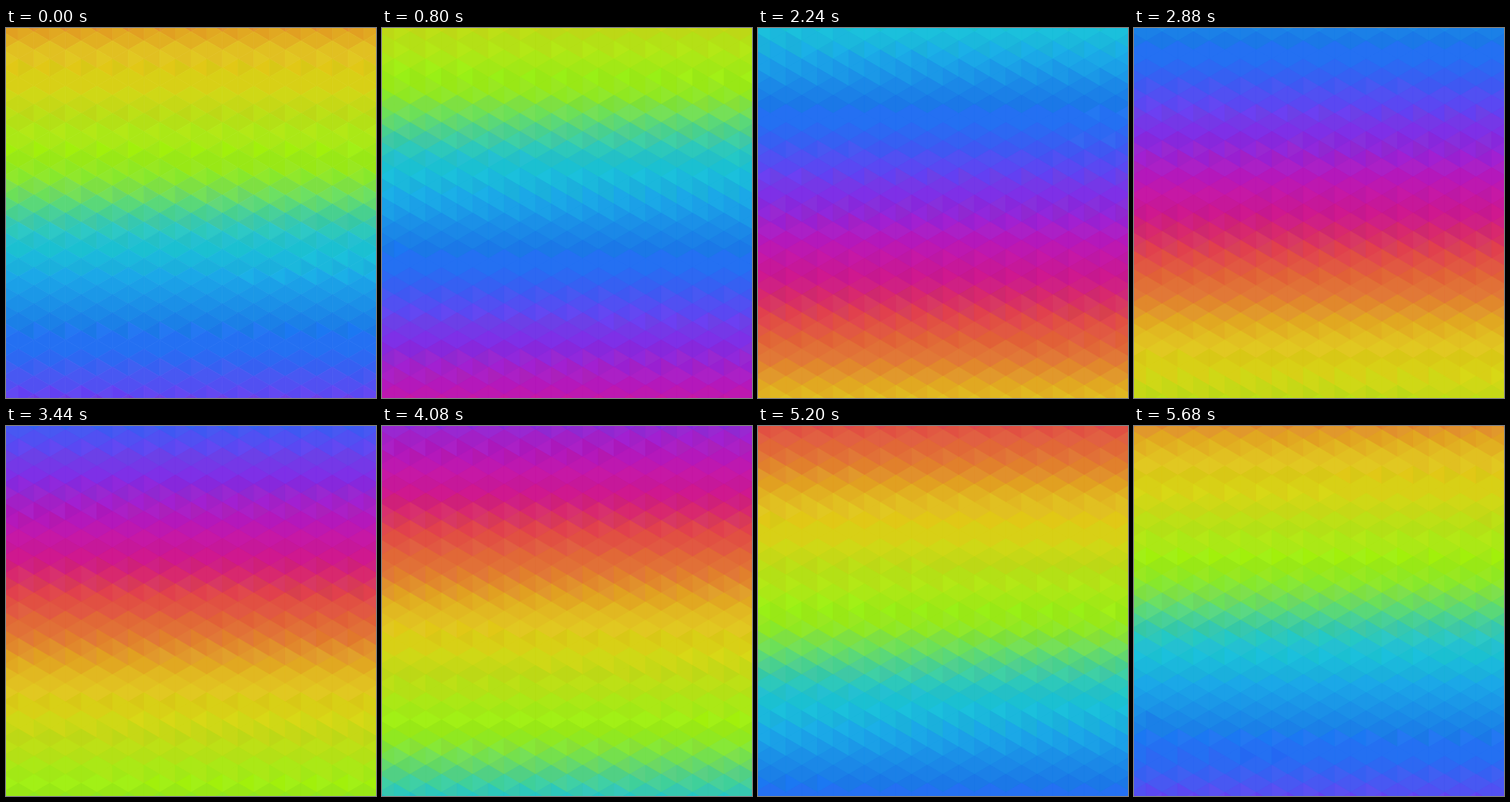
Write an HTML page with a canvas that moves like this. It is 540 by 540 pixels and loops after 5760 ms.

```html
<!DOCTYPE html>
<html lang="en">
<head>
<meta charset="utf-8">
<title>Rainbow facets</title>
<style>
  html, body { margin: 0; width: 100%; height: 100%; overflow: hidden; }
  canvas { display: block; width: 540px; height: 540px; }
</style>
</head>
<body>
<canvas id="stage" width="540" height="540"></canvas>
<script>
const SIZE = 540, MID = SIZE / 2;
const SIDE = 26.46, HALF = SIDE / 2, COL = SIDE * Math.sqrt(3) / 2;
const STEP_MS = 80, STEPS = 72;
const PERIOD = 840; // height in px of one full colour cycle

// Evenly spaced colours around the cycle
const stops = `
  e29f26 e2be20 dccb1a d3d51b bedb1a b0e516 a0ed10
  92e920 73de57 48cf94 27c5c6 19beda 1aace2 1c99e4
  1e83e9 2073ee 2c69ef 4856ee 6641ed 7d30e8 9626d4
  af1bbd c116a8 cb1691 d52c6a df484a e2623c e37a32
`.trim().split(/\s+/).map(h => [0, 2, 4].map(i => parseInt(h.substr(i, 2), 16)));

const snap = (v, step) => Math.round(v / step) * step;

function colorAt(u) {
  const p = ((u / PERIOD % 1 + 1) % 1) * stops.length;
  const i = Math.floor(p), f = p - i;
  const a = stops[i], b = stops[(i + 1) % stops.length];
  const [r, g, bl] = a.map((v, k) => v + (b[k] - v) * f);
  return `rgb(${snap(r, 9)},${snap(g, 8)},${snap(bl, 11)})`;
}

// Triangles with vertical edges on a grid centred in the stage
const tris = [];
for (let c = -12; c < 12; c++) {
  for (let r = -22; r <= 22; r++) {
    const right = (r + c) % 2 !== 0;
    const x0 = MID + c * COL, x1 = x0 + COL, y = MID + r * HALF;
    tris.push({
      edge: right ? x0 : x1,
      tip: right ? x1 : x0,
      y,
      u: y + (right ? 1.6 : -1.6) - x0 * 0.003
    });
  }
}

const ctx = document.getElementById('stage').getContext('2d');
ctx.lineWidth = 0.7;
ctx.lineJoin = 'round';

function draw(step) {
  const shift = step / STEPS * PERIOD;
  for (const t of tris) {
    ctx.fillStyle = ctx.strokeStyle = colorAt(t.u + shift);
    ctx.beginPath();
    ctx.moveTo(t.edge, t.y - HALF);
    ctx.lineTo(t.tip, t.y);
    ctx.lineTo(t.edge, t.y + HALF);
    ctx.closePath();
    ctx.fill();
    ctx.stroke();
  }
}

const start = performance.now();
let shown = -1;
function tick() {
  const step = Math.floor((performance.now() - start) / STEP_MS) % STEPS;
  if (step !== shown) draw(shown = step);
  requestAnimationFrame(tick);
}
tick();
</script>
</body>
</html>
```
